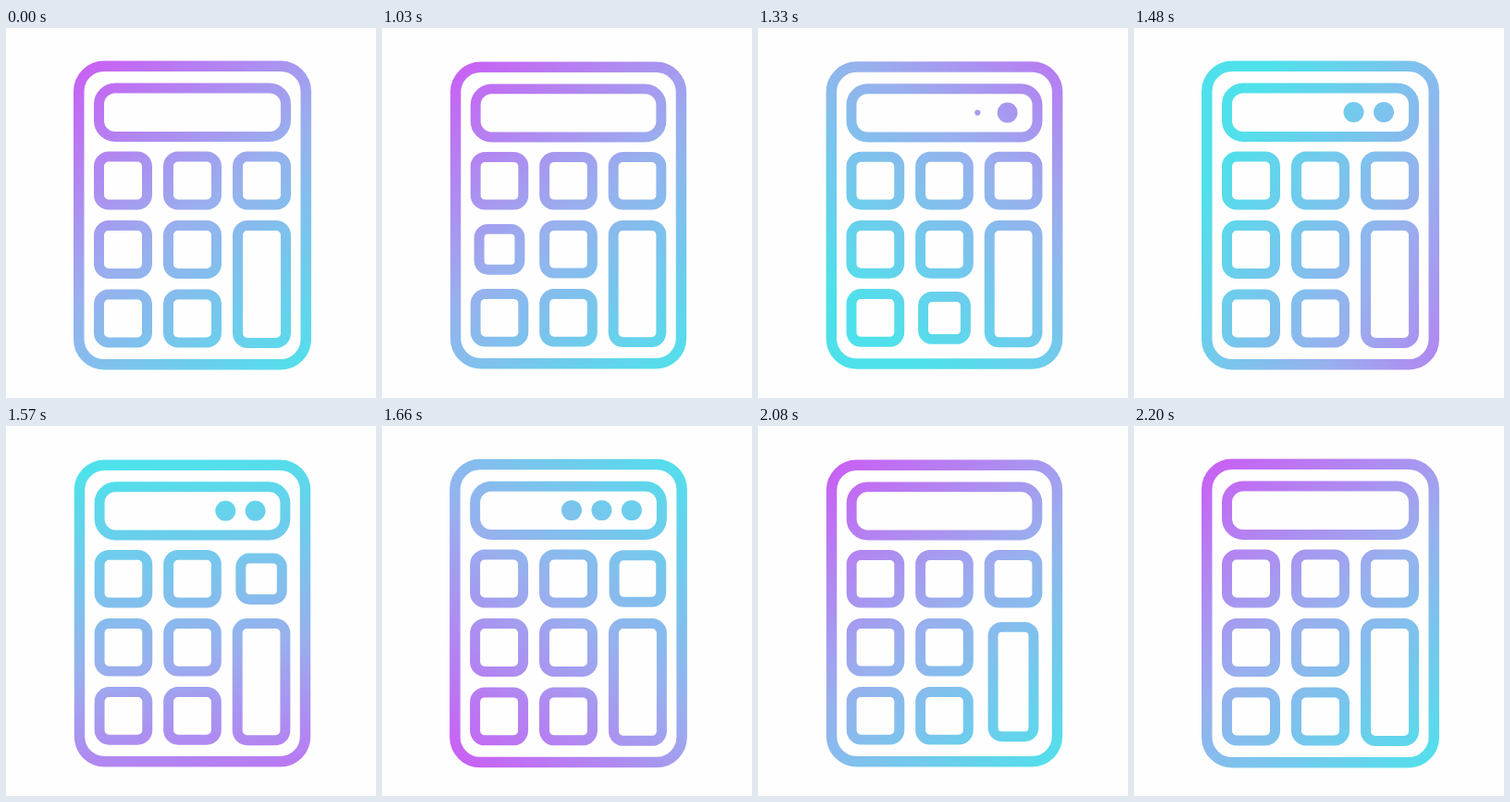
Recreate the animation shown at these times as an HTML page with a canvas. Size 400 by 400 pixels, loop 2.23 s.

```html
<!DOCTYPE html>
<html lang="en">
<head>
<meta charset="utf-8">
<title>Calculator</title>
<style>
  html, body { margin: 0; width: 100%; height: 100%; overflow: hidden; background: #fefefe; }
  canvas { display: block; width: 400px; height: 400px; }
</style>
</head>
<body>
<canvas id="stage" width="400" height="400"></canvas>
<script>
const ctx = document.getElementById('stage').getContext('2d');
const LOOP = 2230, HOLD = 1030, STEP = 30;
const CX = 201.5, CY = 202.5, HALF_W = 128.5, HALF_H = 167;
const STROKE = 11;
const FIRST_PRESS = 1000, PRESS_GAP = 260, PRESS_TIME = 160;
const SPIN_START = 1030, SPIN_TIME = 980, PIVOT_X = CX + 57;

const clamp = v => Math.max(0, Math.min(1, v));

const key = (col, row, press = -1, h = 63) =>
  ({ x: 95 + 75 * col, y: 133.5 + 74.5 * row, w: 63, h, press });

// The press number gives each key its turn
const keys = [
  key(0, 0), key(1, 0, 3), key(2, 0, 2),
  key(0, 1, 0), key(1, 1), key(2, 1, 4, 138),
  key(0, 2), key(1, 2, 1)
];

const pressStart = i => FIRST_PRESS + i * PRESS_GAP;

// Quick push, slower release
function pressDepth(t, i) {
  const u = (t - pressStart(i)) / PRESS_TIME;
  return clamp(Math.min(u / 0.2, (1 - u) / 0.8));
}

function box(x, y, w, h, radius, inset = 0, line = STROKE) {
  const d = inset + line / 2;
  ctx.lineWidth = line;
  ctx.beginPath();
  ctx.roundRect(x + d, y + d, w - 2 * d, h - 2 * d, radius - line / 2 - inset / 4);
  ctx.stroke();
}

function spinningGradient(t) {
  const u = clamp((t - SPIN_START) / SPIN_TIME);
  const angle = Math.PI * (1 - Math.cos(Math.PI * u));
  const cos = Math.cos(angle), sin = Math.sin(angle);
  const turn = (x, y) => {
    const dx = x - PIVOT_X, dy = y - CY;
    return [PIVOT_X + dx * cos - dy * sin, CY + dx * sin + dy * cos];
  };
  const g = ctx.createLinearGradient(
    ...turn(CX - HALF_W, CY - HALF_H), ...turn(CX + HALF_W, CY + HALF_H));
  g.addColorStop(0, '#cb5cf4');
  g.addColorStop(0.5, '#98b0ee');
  g.addColorStop(1, '#4fe1eb');
  return g;
}

function draw(t) {
  ctx.clearRect(0, 0, 400, 400);
  ctx.fillStyle = ctx.strokeStyle = spinningGradient(t);

  const depth = Math.max(...[0, 1, 2, 3, 4].map(i => pressDepth(t, i)));
  const scale = 1 - 0.007 * depth;
  ctx.save();
  ctx.translate(CX, CY);
  ctx.scale(scale, scale);
  ctx.translate(-CX, -CY);

  box(73, 35.5, 257, 334, 33, 0, 11.5);
  box(95, 59.5, 213, 63.5, 23);
  for (const k of keys) {
    box(k.x, k.y, k.w, k.h, 16, k.press < 0 ? 0 : 4.2 * pressDepth(t, k.press));
  }

  // Each key adds a dot; the tall key clears the display
  if (t < pressStart(4)) {
    for (let i = 0; i < 4; i++) {
      const grow = clamp((t - pressStart(i) - 50) / 70);
      ctx.beginPath();
      ctx.arc(270 - 32.5 * i, 91, 11 * grow, 0, 2 * Math.PI);
      ctx.fill();
    }
  }
  ctx.restore();
}

function tick() {
  const now = performance.now() % LOOP;
  draw(now < HOLD ? 0 : HOLD + Math.floor((now - HOLD) / STEP) * STEP);
  requestAnimationFrame(tick);
}
tick();
</script>
</body>
</html>
```
